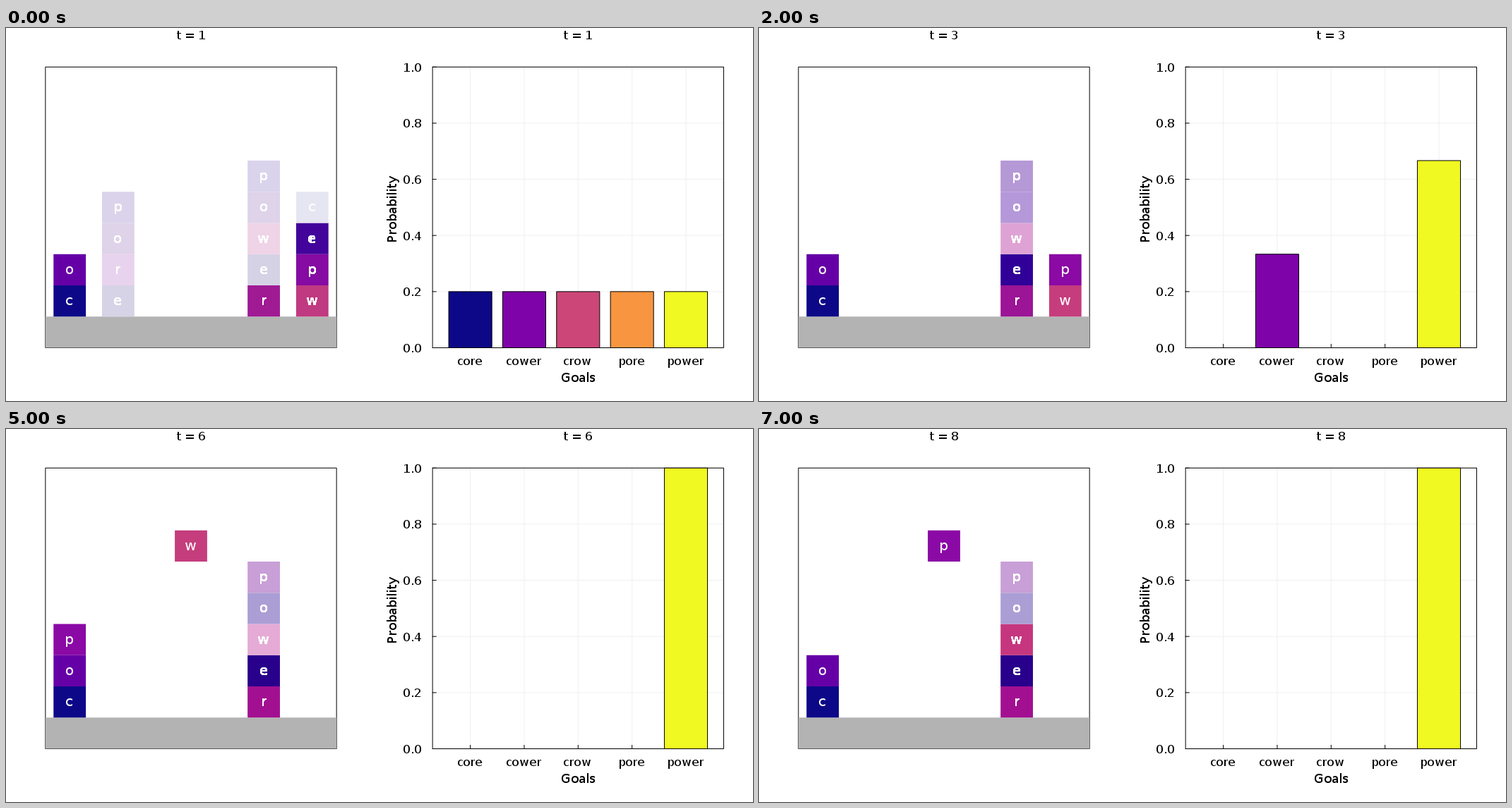
Animation, 1058 px wide and 529 px high, one loop 8000 ms. Source, as a matplotlib script:

```python
import matplotlib.pyplot as plt
from matplotlib.animation import FuncAnimation
from matplotlib.patches import Rectangle

W, H, DPI = 1058, 529, 100
TOP, BOTTOM = 55.3, 453.5
LEFT, RIGHT, SIZE = 55.85, 604.15, 412.3
UNIT = (BOTTOM - TOP) / 9
BLOCK_W = SIZE / 9
STEP = SIZE / 5.4
LINE = 72 / DPI

plt.rcParams.update({"font.family": "DejaVu Sans", "text.hinting": "default",
                     "text.hinting_factor": 1})
fig = plt.figure(figsize=(W / DPI, H / DPI), dpi=DPI, facecolor="white")
ax = fig.add_axes([0, 0, 1, 1])
ax.set(xlim=(0, W), ylim=(H, 0))
ax.axis("off")

GOALS = ["core", "cower", "crow", "pore", "power"]
GOAL_COLORS = ["#0d0887", "#7e03a8", "#cc4778", "#f89540", "#f0f921"]
PROBS = [[0.2] * 5, [0, 0.2, 0, 0.4, 0.4], [0, 1 / 3, 0, 0, 2 / 3]]
PROBS += [[0, 0, 0, 0, 1]] * 5

SOLID = {"c": "#0d0887", "o": "#6500a7", "e": "#40039c",
         "p": "#8b09a5", "w": "#c53d7d"}

# A tower lists (letters, colour) from the ground up; repeated letters overprint.
FINAL_TOP = [("ooo", "#ab9ed5"), ("ppp", "#c89fd6")]
FINAL_BASE = [("rrr", "#a21091"), ("eee", "#28008b")]
GHOST_POWER = FINAL_BASE + [("www", "#e5abd6")] + FINAL_TOP
BUILT_POWER = FINAL_BASE + [("www", "#c6367f")] + FINAL_TOP


def solid(letters):
    return [(s, SOLID[s]) for s in letters]


# Each step: held letter and towers keyed by column.
STEPS = [
    ("", {0: solid("co"),
          1: [("ee", "#d7d3e6"), ("rr", "#e8d3ee"),
              ("oo", "#ded3e9"), ("ppp", "#dbd3eb")],
          4: [("rrr", "#a01a94"), ("ee", "#d5d2e5"), ("www", "#efd3e6"),
              ("oo", "#ded3e9"), ("ppp", "#dad3ec")],
          5: [("www", "#bf3a80"), ("ppp", "#850ba2"),
              ("eer", "#42049b"), ("c", "#e6e6f2")]}),
    ("e", {0: solid("co"),
           1: [("ee", "#d3d3e8"), ("rr", "#ead2ef"),
               ("oo", "#dcd3eb"), ("pp", "#e5d3ed")],
           4: [("rrr", "#9f1a98"), ("ee", "#c2c0e1"), ("www", "#ebc3e4"),
               ("oo", "#d0bfe6"), ("ppp", "#d1bfe6")],
           5: solid("wp")}),
    ("", {0: solid("co"),
          4: [("rrr", "#9b1596"), ("eee", "#300098"), ("www", "#dea3d4"),
              ("ooo", "#b498d9"), ("ppp", "#b598d6")],
          5: solid("wp")}),
    ("p", {0: solid("co"), 4: GHOST_POWER, 5: solid("w")}),
    ("", {0: solid("cop"), 4: GHOST_POWER, 5: solid("w")}),
    ("w", {0: solid("cop"), 4: GHOST_POWER}),
    ("", {0: solid("cop"), 4: BUILT_POWER}),
    ("p", {0: solid("co"), 4: BUILT_POWER}),
]


def rect(x, y, w, h, fill="none", edge="none", z=1):
    return ax.add_patch(Rectangle((x, y), w, h, facecolor=fill, edgecolor=edge,
                                  linewidth=LINE, zorder=z, snap=False))


def line(x0, y0, x1, y1, color="black", z=2):
    ax.plot([x0, x1], [y0, y1], color=color, linewidth=LINE, zorder=z, snap=False)


def label(x, y, s, px, color="black", ha="center", va="baseline", **kw):
    return ax.text(x, y, s, fontsize=px * 72 / DPI, color=color, ha=ha, va=va,
                   zorder=6, **kw)


def block(cx, level, letters, color):
    y = BOTTOM - (level + 1) * UNIT
    parts = [rect(cx - BLOCK_W / 2, y, BLOCK_W, UNIT, color, z=4)]
    for s in letters * len(letters):
        parts.append(label(cx - 0.5, y + UNIT / 2 + 6, s, 20, "white"))
    return parts


def goal_x(i):
    return RIGHT + SIZE / 2 + (i - 2) * STEP


def draw_static():
    rect(LEFT, TOP, SIZE, BOTTOM - TOP, edge="black", z=2)
    rect(LEFT, BOTTOM - UNIT, SIZE, UNIT, "#b3b3b3", z=3)

    rect(RIGHT, TOP, SIZE, BOTTOM - TOP, edge="black", z=3)
    for i, goal in enumerate(GOALS):
        x = goal_x(i)
        line(x, TOP, x, BOTTOM, "#f0f0f0", 1)
        line(x, BOTTOM, x, BOTTOM - 5)
        label(x - 0.8, 478.3, goal, 17)
    for i in range(6):
        y = BOTTOM + (TOP - BOTTOM) * i / 5
        line(RIGHT, y, RIGHT + SIZE, y, "#f0f0f0", 1)
        line(RIGHT, y, RIGHT + 5, y)
        label(589, y + 6.5, f"{i / 5:.1f}", 17, ha="right")
    label(810, 502, "Goals", 18.5)
    label(547, 255, "Probability", 18.5, va="center", rotation=90)


draw_static()
titles = [label(x, 16, "", 17) for x in (262, 810)]
moving = []


def update(step):
    while moving:
        moving.pop().remove()
    for title in titles:
        title.set_text(f"t = {step + 1}")
    held, towers = STEPS[step]
    for col, tower in towers.items():
        for level, (letters, color) in enumerate(tower, 1):
            moving.extend(block(LEFT + SIZE * (col + 0.5) / 6, level, letters, color))
    if held:
        moving.extend(block(LEFT + SIZE / 2, 6, held, SOLID[held]))
    for i, p in enumerate(PROBS[step]):
        if p:
            h = p * (BOTTOM - TOP)
            moving.append(rect(goal_x(i) - 0.4 * STEP, BOTTOM - h, 0.8 * STEP, h,
                               GOAL_COLORS[i], "black", z=4))
    return moving + titles


anim = FuncAnimation(fig, update, frames=len(STEPS), init_func=lambda: update(0),
                     interval=1000, repeat=True, repeat_delay=0, blit=False)
plt.show()
```
